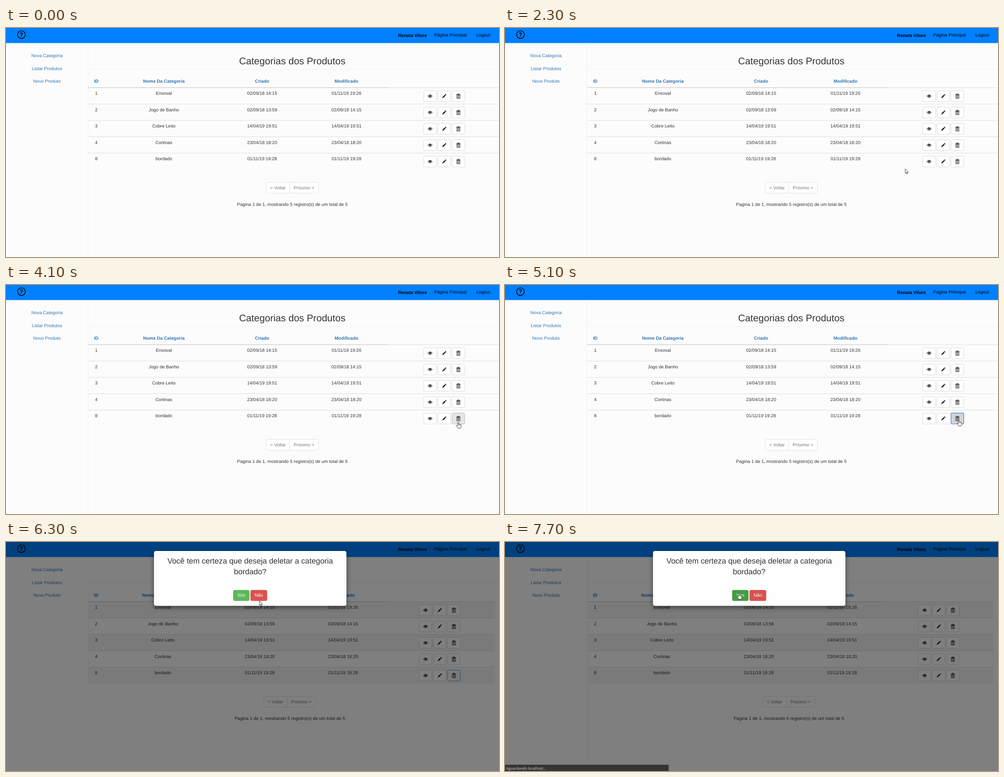
An HTML page with a canvas that plays this animation: 1095x511 px, repeating every 8 s.

```html
<!DOCTYPE html>
<html lang="pt-BR">
<head>
<meta charset="utf-8">
<title>Categorias dos Produtos</title>
<style>
  html, body { margin: 0; width: 100%; height: 100%; overflow: hidden; background: #fcfcfc; }
  canvas { display: block; }
</style>
</head>
<body>
<canvas id="stage" width="1095" height="511"></canvas>
<script>
const ctx = document.getElementById('stage').getContext('2d');
const W = 1095, H = 511, LOOP = 8000, STEP = 100;
const SANS = '"Liberation Sans", Arial, sans-serif';
const SYSTEM = '"Open Sans", "Noto Sans", sans-serif';
const INK = '#333', LINK = '#2f76b5', RULE = '#d9d9d9', BODY = 10.03;
const LEFT = 182, HEADER_H = 33.6, ROW_TOP = 133.5, ROW_H = 36.47;
const CUE = { press: 5100, dialog: 5200, status: 6700, tip: 6900, confirm: 7200, wait: 7700 };
const BUTTON = { x: 927.8, y: 139.9, w: 28.2, h: 24.3, pitch: 31.45 };
const YES = { x: 504.9, y: 107.6, w: 35.4, h: 23.5 };

const headings = ['ID', 'Nome Da Categoria', 'Criado', 'Modificado'];
const columnX = [200.6, 350.6, 568.8, 756.2];
const rows = [
  '1|Enxoval|02/09/18 14:15|01/11/19 19:26',
  '2|Jogo de Banho|02/09/18 13:59|02/09/18 14:15',
  '3|Cobre Leito|14/04/19 19:51|14/04/19 19:51',
  '4|Cortinas|23/04/18 18:20|23/04/18 18:20',
  '8|bordado|01/11/19 19:28|01/11/19 19:28'
].map(line => line.split('|'));
const LAST = rows.length - 1;

// Pointer strokes: begin, end, destination
const strokes = [
  [200, 600, 472, 103], [800, 1200, 601, 227.5], [1300, 1700, 648, 299], [1800, 2100, 882, 308.5],
  [2200, 2300, 889, 314.5], [2300, 2800, 924, 313.5], [3100, 3500, 952.5, 306], [3500, 4000, 999, 306.5],
  [4000, 4300, 1010, 305], [4500, 4800, 1008, 301], [5500, 5700, 668, 174], [5800, 6800, 519.5, 114]
];

function pointerAt(t) {
  if (t < strokes[0][0]) return null;
  const p = { x: 19, y: 1 };
  for (const [begin, end, x, y] of strokes) {
    const k = Math.min(1, Math.max(0, (t - begin) / (end - begin)));
    const eased = Math.sin(k * Math.PI / 2);
    p.x += (x - p.x) * eased;
    p.y += (y - p.y) * eased;
  }
  return p;
}

function text(str, x, y, { size = BODY, color = INK, bold = false, align = 'center', face = SANS } = {}) {
  ctx.font = `${bold ? 'bold ' : ''}${size}px ${face}`;
  ctx.textAlign = align;
  ctx.fillStyle = color;
  ctx.fillText(str, x, y);
}

function rect(x, y, w, h, color) {
  ctx.fillStyle = color;
  ctx.fillRect(x, y, w, h);
}

function box(x, y, w, h, r, fill, stroke, line = 0.8) {
  ctx.beginPath();
  ctx.roundRect(x, y, w, h, r);
  ctx.fillStyle = fill;
  ctx.fill();
  if (stroke) {
    ctx.strokeStyle = stroke;
    ctx.lineWidth = line;
    ctx.stroke();
  }
}

function at(x, y, draw) {
  ctx.save();
  ctx.translate(x, y);
  draw();
  ctx.restore();
}

function lens(w, h, color) {
  ctx.beginPath();
  ctx.moveTo(-w, 0);
  ctx.quadraticCurveTo(0, -h, w, 0);
  ctx.quadraticCurveTo(0, h, -w, 0);
  ctx.fillStyle = color;
  ctx.fill();
}

function disc(x, y, r, color) {
  ctx.beginPath();
  ctx.arc(x, y, r, 0, Math.PI * 2);
  ctx.fillStyle = color;
  ctx.fill();
}

const icons = [
  function eye(bg) {
    lens(5.4, 7, '#222');
    lens(4.1, 5, bg);
    disc(0, -0.4, 2.4, '#222');
    disc(-0.7, -1.1, 0.7, bg);
  },
  function pencil() {
    ctx.rotate(-Math.PI / 4);
    rect(-3.4, -1.45, 6.2, 2.9, '#222');
    rect(3.5, -1.45, 2, 2.9, '#222');
    ctx.fill(new Path2D('M-3.4 -1.45L-6.4 0L-3.4 1.45Z'));
  },
  function trash() {
    ctx.strokeStyle = INK;
    ctx.lineWidth = 0.9;
    ctx.strokeRect(-1.6, -5.3, 3.2, 1.6);
    rect(-4.6, -4.1, 9.2, 1.3, INK);
    ctx.strokeRect(-3.6, -2, 7.2, 7.1);
    for (let x = -1.8; x < 2; x += 1.8) rect(x - 0.4, -2, 0.8, 7, INK);
  }
];

const buttonStyles = {
  normal: { fill: '#fff', edge: '#d0d0d0', line: 0.8, radius: 2.9 },
  hover: { fill: '#e6e6e6', edge: '#adadad', line: 0.8, radius: 2.9 },
  focus: { fill: '#f5f5f5', edge: '#5e92e0', line: 1, radius: 1.5 },
  active: { fill: '#d4d4d4', edge: '#4f92e0', line: 1.4, radius: 1.5 }
};

const buttonRect = (col, row) => ({
  x: BUTTON.x + col * BUTTON.pitch, y: BUTTON.y + row * ROW_H, w: BUTTON.w, h: BUTTON.h
});
const inside = (p, r) => p.x >= r.x && p.x <= r.x + r.w && p.y >= r.y && p.y <= r.y + r.h;
const hoveredButton = p => icons.findIndex((_, col) => inside(p, buttonRect(col, LAST)));

function buttonState(t, col, row, hover) {
  if (row !== LAST) return 'normal';
  if (col === 2 && t >= CUE.press && t < CUE.confirm) return t < CUE.dialog ? 'active' : 'focus';
  return col === hover ? 'hover' : 'normal';
}

function drawButton(col, row, shift, state) {
  const { fill, edge, line, radius } = buttonStyles[state];
  const { x, y, w, h } = buttonRect(col, row);
  box(x - shift, y, w, h, radius, fill, edge, line);
  at(x - shift + w / 2, y + h / 2, () => icons[col](fill));
}

function drawHeader() {
  rect(0, 0, W, HEADER_H, '#0080ff');
  ctx.beginPath();
  ctx.arc(34.3, 14.8, 8.6, 0, Math.PI * 2);
  ctx.strokeStyle = '#000';
  ctx.lineWidth = 1.6;
  ctx.stroke();
  text('?', 34.3, 19.4, { size: 13, bold: true, color: '#000' });
  const nav = { color: '#000', align: 'left' };
  text('Renata Vilore', 870.9, 19.7, { ...nav, bold: true });
  text('Página Principal', 951, 18.6, nav);
  text('Logout', 1044.8, 18.6, nav);
}

function drawSidebar() {
  rect(LEFT - 0.3, HEADER_H, 0.8, H, '#ebebeb');
  ['Nova Categoria', 'Listar Produtos', 'Novo Produto'].forEach((label, i) =>
    text(label, 91, 65.3 + i * 28.5, { color: LINK }));
}

function drawTable(t, modal, hover) {
  const shift = modal ? 10 : 0, width = W - LEFT - shift, fit = modal ? 0.987 : 1;
  const centers = columnX.map(x => LEFT + (x - LEFT) * fit);
  headings.forEach((h, i) => text(h, centers[i], 122.4, { bold: true, color: LINK }));
  rows.forEach((row, r) => {
    const y = ROW_TOP + r * ROW_H;
    if (modal && r % 2 === 0) rect(LEFT, y, width, ROW_H, '#f5f5f5');
    rect(LEFT, y - 0.7, width, 0.9, RULE);
    row.forEach((cell, c) => text(cell, centers[c], y + 15.8));
    icons.forEach((_, c) => drawButton(c, r, shift, buttonState(t, c, r, hover)));
  });
  rect(LEFT, 132.3, 668 * fit, 1.4, '#d4d4d4');
}

function drawPager(middle) {
  const x = middle - 57.8, gray = { color: '#777' };
  box(x, 344.5, 115.6, 24.1, 2.9, '#fff', RULE);
  rect(x + 51.9, 344.5, 0.8, 24.1, RULE);
  text('< Voltar', x + 26.2, 359.5, gray);
  text('Próximo >', x + 83.8, 359.5, gray);
  text('Pagina 1 de 1, mostrando 5 registro(s) de um total de 5', middle + 0.2, 397.2);
}

function drawPage(t, modal, hover) {
  const middle = modal ? 630.2 : 635.8;
  rect(0, 0, W, H, modal ? '#fff' : '#fcfcfc');
  drawSidebar();
  drawHeader();
  text('Categorias dos Produtos', middle, 81, { size: 21.48 });
  rect(LEFT, 92, W - LEFT, 0.8, '#eee');
  drawTable(t, modal, hover);
  drawPager(middle);
}

function drawDialog(t, over) {
  rect(0, 0, W, H, 'rgba(0,0,0,.5)');
  ctx.save();
  ctx.shadowColor = 'rgba(0,0,0,.5)';
  ctx.shadowBlur = 10.7;
  ctx.shadowOffsetY = 3.6;
  box(328.7, 20.1, 427.4, 122.4, 4.3, '#fefefe');
  ctx.restore();
  const title = { size: 17.15 };
  text('Você tem certeza que deseja deletar a categoria', 542.4, 48.4, title);
  text('bordado?', 542.4, 72.4, title);
  const pressed = t >= CUE.confirm && t < CUE.confirm + STEP;
  const green = pressed ? '#398439' : over ? '#449d44' : '#5cb85c';
  box(YES.x, YES.y, YES.w, YES.h, 2.9, green, over ? '#398439' : '#4cae4c', 0.7);
  box(543.3, YES.y, 36.5, YES.h, 2.9, '#d9534f', '#d43f3a', 0.7);
  text('Sim', 522.6, 122.4, { color: '#fff' });
  text('Não', 561.5, 122.4, { color: '#fff' });
}

function drawStatus(t) {
  const waiting = t >= CUE.wait;
  const label = waiting ? 'Aguardando localhost...' : 'localhost/projeto/categorias-produtos#';
  ctx.globalAlpha = Math.min(1, (t - CUE.status + STEP) / (2 * STEP));
  box(-3, 497, waiting ? 366.5 : 160, 18, 2, '#333435');
  text(label, 2.5, 507.5, { size: 8.15, align: 'left', face: SYSTEM, color: '#dadada' });
  ctx.globalAlpha = 1;
}

function drawTooltip() {
  box(524.4, 123.3, 39, 17.2, 0, '#fff', '#555');
  text('Deletar', 543.6, 135, { size: 8.1, face: SYSTEM, color: '#222' });
}

const arrow = new Path2D('M0 0V9.8L2.2 7.8L3.8 11.4L5.4 10.7L3.9 7.2H6.9Z');
const hand = new Path2D('M-1.2 9V1Q0 -.7 1.2 1V5Q2.6 4.2 3.4 5.4Q4.6 4.9 5.2 6Q6.4 5.6 6.4 7.2V10' +
  'Q6.3 11.6 5.3 12.6V13.8H-.8V12.6Q-2.6 11 -3.7 8.6Q-4 7.2 -2.8 7.4Z');

function drawPointer(p, linked) {
  at(p.x, p.y, () => {
    const shape = linked ? hand : arrow;
    ctx.fillStyle = '#fff';
    ctx.strokeStyle = '#111';
    ctx.lineWidth = 0.8;
    ctx.lineJoin = 'round';
    ctx.fill(shape);
    ctx.stroke(shape);
    if (linked) for (let x = 1.2; x < 6; x += 2) rect(x - 0.25, 5.2, 0.5, 2.2, '#111');
  });
}

function render(time) {
  const t = Math.floor((time % LOOP) / STEP) * STEP;
  const modal = t >= CUE.dialog;
  const p = pointerAt(t);
  const hover = p && !modal ? hoveredButton(p) : -1;
  const overYes = modal && inside(p, YES);
  ctx.textRendering = 'geometricPrecision';
  drawPage(t, modal, hover);
  if (modal) drawDialog(t, overYes);
  if (t >= CUE.status) drawStatus(t);
  if (t >= CUE.tip && t < CUE.confirm) drawTooltip();
  if (p) drawPointer(p, hover >= 0 || overYes);
}

const start = performance.now();
function tick() {
  render(performance.now() - start);
  requestAnimationFrame(tick);
}
tick();
</script>
</body>
</html>
```
